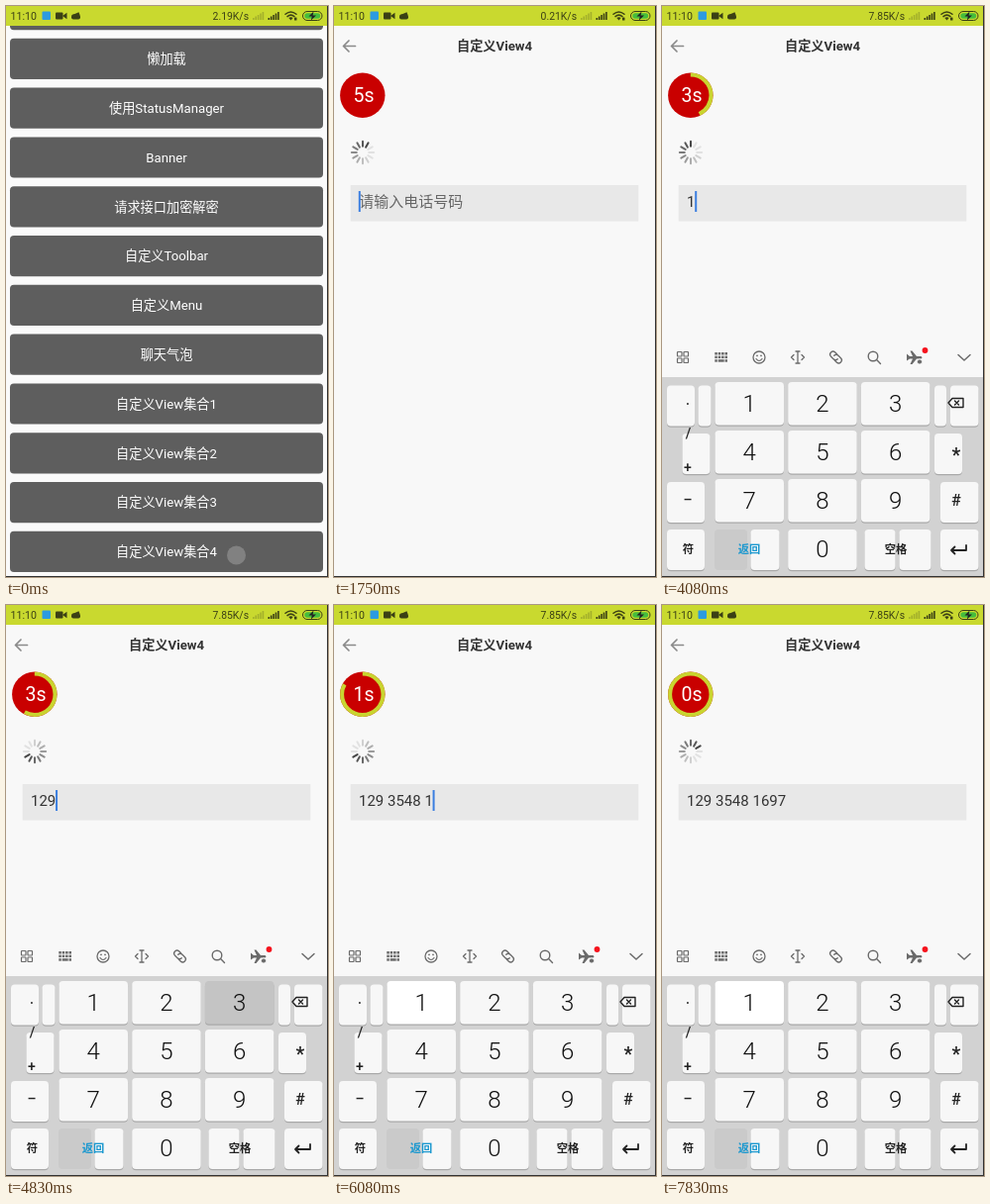
Recreate the animation shown at these times as an HTML page. Size 325 by 577 pixels, loop 7990 ms.

```html
<!DOCTYPE html>
<html lang="zh-CN">
<head>
<meta charset="utf-8">
<title>自定义View4</title>
<style>
html, body { margin: 0; width: 100%; height: 100%; overflow: hidden; background: #f8f8f8; }
svg { display: block; width: 325px; height: 577px; }
text { font-family: Roboto, "Noto Sans CJK SC", "Noto Sans CJK", sans-serif; white-space: pre; }
</style>
</head>
<body>
<svg id="stage" viewBox="0 0 325 577"></svg>
<script>
const LOOP = 7990;
const PAGE_IN = 690, COUNT_START = 1930, COUNT_LENGTH = 5000;
const BOARD_IN = 2090, SWITCH_DOWN = 3420, SWITCH = 3600;
const SPIN_START = 1700, SPIN_STEP = 100;
const NUMBER = '129 3548 1697';
const PRESSES = [3950, 4250, 4500, 4790, 5080, 5350, 5650, 5930, 6250, 6550, 6830];
const HOLD = 110;
const BOLD = 'font-weight="700"', LIGHT = 'font-weight="300"';

const rect = (x, y, w, h, fill, r = 0, more = '') =>
  `<rect x="${x}" y="${y}" width="${w}" height="${h}" rx="${r}" fill="${fill}" ${more}/>`;
const label = (s, x, cy, size, fill, anchor = 'middle', more = '') =>
  `<text x="${x}" y="${cy + size * 0.36}" font-size="${size}" fill="${fill}" text-anchor="${anchor}" ${more}>${s}</text>`;
const line = (d, color = '#666', w = 1.3, more = '') =>
  `<path d="${d}" fill="none" stroke="${color}" stroke-width="${w}" stroke-linecap="round" stroke-linejoin="round" ${more}/>`;
const shape = (d, fill) => `<path d="${d}" fill="${fill}"/>`;
const key = (x, y, w, h = 41, id = '') =>
  rect(x, y + 1.2, w, h, '#a9a9a9', 4) + rect(x, y, w, h, '#f7f7f7', 4, id && `id="${id}"`);

function listView() {
  const items = ['', '懒加载', '使用StatusManager', 'Banner', '请求接口加密解密', '自定义Toolbar', '自定义Menu',
    '聊天气泡', '自定义View集合1', '自定义View集合2', '自定义View集合3', '自定义View集合4'];
  return rect(0, 0, 325, 577, '#fafafa') + items.map((s, i) => {
    const y = -17 + i * 49.8;
    return rect(4, y, 316, 41.2, '#5e5e5e', 4) + label(s, 162, y + 20.6, 13.2, '#fff');
  }).join('') + '<circle id="touch" cx="232.5" cy="555" r="9.5" fill="#999"/>';
}

function pageView() {
  let spokes = '';
  for (let i = 0; i < 12; i++)
    spokes += `<path class="spoke" d="M0-6.2V-11.2" transform="rotate(${i * 30})"/>`;
  return rect(0, 20, 325, 557, '#f8f8f8')
    + line('M21.5 40.5H9.5M15 35L9.5 40.5L15 46', '#8a8a8a', 1.7)
    + label('自定义View4', 162, 40.6, 13.2, '#333', 'middle', BOLD)
    + '<g transform="translate(28.8 90.2)"><circle r="22.7" fill="#c90000"/>'
    + '<circle id="ring" r="20.7" fill="none" stroke="#c9d530" stroke-width="4" pathLength="360" transform="rotate(-90)"/></g>'
    + label('', 30, 90.3, 19.5, '#fff', 'middle', 'id="count"')
    + `<g transform="translate(29 148)" stroke-width="2" stroke-linecap="round">${spokes}</g>`
    + rect(16.7, 181, 290.6, 36.5, '#e8e8e8')
    + label('请输入电话号码', 25.2, 198, 15, '#666', 'start', 'id="hint"')
    + label('', 25, 198, 15, '#333', 'start', 'id="typed"')
    + rect(25, 187, 2, 21, '#3c7fe0', 0, 'id="caret"');
}

function toolbar() {
  const c = '#6a6a6a';
  let s = rect(0, 336, 325, 40, '#f8f8f8');
  for (const [x, y] of [[15.5, 349.5], [22, 349.5], [15.5, 356], [22, 356]])
    s += rect(x, y, 4.5, 4.5, 'none', 0.5, `stroke="${c}" stroke-width="1.2"`);
  for (let i = 0; i < 8; i++)
    s += rect(53.3 + (i % 4) * 3.4, 350 + (i >> 2) * 3.6, 2.5, 2.5, c);
  s += rect(53.3, 357.2, 2.5, 2.5, c) + rect(56.7, 357.2, 6, 2.5, c) + rect(63.5, 357.2, 2.5, 2.5, c);
  s += `<circle cx="98" cy="355" r="6" fill="none" stroke="${c}" stroke-width="1.3"/>`
    + `<circle cx="96" cy="353.3" r=".9" fill="${c}"/><circle cx="100" cy="353.3" r=".9" fill="${c}"/>`
    + line('M95 356.5Q98 360.5 101 356.5', c, 1.2);
  s += line('M135 349H139M137 349V361M135 361H139M133 352.5L130.5 355L133 357.5M141 352.5L143.5 355L141 357.5', c);
  const link = 'M-1.5-3H-4A3 3 0 0 0-4 3H-.5A3 3 0 0 0 2.5 0';
  s += `<g transform="translate(175.5 355) rotate(45)">${line(link, c)}${line(link, c, 1.3, 'transform="rotate(180)"')}</g>`;
  s += `<circle cx="213" cy="354" r="4.8" fill="none" stroke="${c}" stroke-width="1.4"/>` + line('M216.6 357.6L220.5 361.5', c, 1.4);
  s += shape('M247 351.5L250 354H253L250.5 348.5H252.5L257 354H261.5Q263.5 355.3 261.5 356.5H257L252.5 362H250.5L253 356.5H250L247 358.5Z', c)
    + `<circle cx="260" cy="359.5" r="2.6" fill="${c}" stroke="#f8f8f8"/>`
    + '<circle cx="265.5" cy="348" r="2.9" fill="#f5121d"/>';
  return s + line('M299 352.5L305 358L311 352.5', c, 1.5);
}

const backspace = (x, y) => line(`M${x - 8} ${y}L${x - 4} ${y - 4.5}H${x + 7}V${y + 4.5}H${x - 4}ZM${x - 1.5} ${y - 2}l4 4m0-4l-4 4`, '#222', 1.4);
const enter = (x, y) => line(`M${x + 8} ${y - 4}V${y + 1}H${x - 7}M${x - 3.5} ${y - 2.5}L${x - 7} ${y + 1}L${x - 3.5} ${y + 4.5}`, '#222', 1.8);
const word = (s, x, y, color = '#222') => label(s, x, y, 11.3, color, 'middle', BOLD);

function letterBoard() {
  const rows = [
    ['QWERTYUIOP', '1234567890', 18.5, 383.5],
    ['ASDFGHJKL', '~!@#%\'"*?', 34.5, 432],
    ['ZXCVBNM', '()-_:;/', 66.5, 481]
  ];
  let s = rect(0, 375, 325, 202, '#d4d4d4');
  for (const [letters, hints, x0, y] of rows)
    [...letters].forEach((ch, i) => {
      const x = x0 + i * 31.8;
      s += key(x - 13.8, y, 27.6) + label(ch, x, y + 23.3, 19.8, '#111', 'middle', LIGHT)
        + label(hints[i], x, y + 8, 7.5, '#bbb');
    });
  s += key(5, 481, 38) + word('分词', 24, 501.5) + key(281, 481, 38.5) + backspace(300, 501.5);
  const bottom = [[5, 38], [47, 38, 'switchKey'], [89.5, 28.5], [122.5, 78], [204.5, 31], [239.5, 37.5], [281, 38.5]];
  for (const [x, w, id] of bottom) s += key(x, 529, w, 41, id);
  return s + word('符', 24, 549) + label('123', 66, 549, 11.5, '#222', 'middle', 'font-weight="500"')
    + shape('M102 547.5h2.8v2.4q-.4 2.4-2.4 3.2q1.2-1.4 1.1-2.8h-1.5z', '#222')
    + word('空格', 159.5, 549)
    + rect(179, 543.5, 4, 7, 'none', 2, 'stroke="#aaa"') + line('M176.8 548.5Q177 552.5 181 552.5T185.2 548.5M181 552.5V554.5', '#aaa', 1)
    + '<circle cx="218" cy="550" r="2.1" fill="none" stroke="#222" stroke-width="1.3"/>'
    + label('英', 252, 545, 9, '#999') + line('M255.5 555L264 543', '#aaa', 0.8) + label('中', 263.5, 554.5, 9.5, '#222', 'middle', BOLD)
    + enter(300, 549);
}

function numberBoard() {
  let s = rect(0, 375, 325, 202, '#d2d2d2');
  const side = [[5, 383.5, 28], [36.5, 383.5, 13], [20.5, 432, 28], [5, 481, 38], [5, 529, 38], [89.5, 529, 29],
    [204.5, 529, 31], [239.5, 529, 32], [275, 383.5, 12], [291, 383.5, 28.5], [275, 432, 28], [281, 481, 38.5], [281, 529, 38.5]];
  s += rect(53, 529, 33, 41, '#cacaca', 4);
  for (const [x, y, w] of side) s += key(x, y, w);
  for (let n = 1; n <= 9; n++) {
    const x = 53.5 + ((n - 1) % 3) * 73.7, y = 380 + Math.floor((n - 1) / 3) * 49;
    s += key(x, y, 69.5, 43.5, 'digit' + n) + label(n, x + 34.7, y + 21.5, 24, '#111', 'middle', LIGHT);
  }
  s += key(127.2, 529, 69.5, 41, 'digit0') + label(0, 162, 548.5, 24, '#111', 'middle', LIGHT);
  const marks = [['·', 26, 402], ['/', 26.5, 432], ['+', 26, 466], ['–', 26, 498.5], ['*', 297, 453.5], ['#', 297, 499]];
  for (const [ch, x, y] of marks)
    s += label(ch, x, y, ch === '*' ? 20 : x > 100 ? 16 : 14, '#222', 'middle', 'font-weight="500"');
  return s + word('符', 26.5, 548.5) + word('返回', 88, 548.5, '#1b98cf') + word('空格', 236, 548.5)
    + backspace(297, 401) + enter(299, 549);
}

function statusBar() {
  const ink = '#3b4015';
  let s = rect(0, 0, 325, 20, '#c9d92f') + label('11:10', 4.5, 10.3, 10.6, ink, 'start')
    + rect(36.5, 5.5, 8.5, 8.5, '#2c9be0', 1)
    + rect(50, 6.5, 7.5, 7, ink, 1) + shape('M57 10L61.5 6.8V13.2Z', ink)
    + rect(66, 8.5, 9, 5, ink, 2) + shape('M67 9L73.5 6.3L74.5 9Z', ink)
    + label('', 245, 10.3, 10.4, ink, 'end', 'id="speed"');
  for (let i = 0; i < 5; i++) {
    const h = 2 + i * 1.5;
    s += rect(249 + i * 2.4, 14 - h, 1.6, h, '#a3b02b') + rect(264.5 + i * 2.4, 14 - h, 1.6, h, ink);
  }
  return s + line('M282 8.3Q287.5 3.6 293 8.3M284 10.6Q287.5 7.6 291 10.6', ink, 1.5)
    + shape('M285.3 12Q287.5 10.3 289.7 12L287.5 14.5Z', ink) + rect(291, 11.5, 2.5, 3, ink, 0.5)
    + rect(299.5, 5.5, 19.5, 9, '#c9d92f', 4.5, `stroke="${ink}"`) + rect(301.3, 7.2, 15.9, 5.6, '#46bd3c', 2.8)
    + shape('M310.5 5.5L305.5 10.4H308.8L307.8 14.5L313 9.4H309.6Z', '#222');
}

document.getElementById('stage').innerHTML =
  listView() + `<g id="page">${pageView()}</g>`
  + `<g id="board">${toolbar()}<g id="letters">${letterBoard()}</g><g id="numbers">${numberBoard()}</g></g>`
  + statusBar() + rect(324, 0, 1, 577, '#333') + rect(0, 576, 325, 1, '#333');

const $ = id => document.getElementById(id);
const set = (id, name, value) => $(id).setAttribute(name, value);
const show = (id, on) => set(id, 'visibility', on ? 'visible' : 'hidden');
const progress = (t, start, length) => Math.min(1, Math.max(0, (t - start) / length));
const spokes = [...document.querySelectorAll('.spoke')];
const digits = NUMBER.replace(/ /g, '');

function draw(t) {
  set('touch', 'opacity', 0.6 * (1 - progress(t, 90, 160)));
  set('page', 'opacity', progress(t, PAGE_IN, 110));
  $('speed').textContent = t < 740 ? '2.19K/s' : t < 3420 ? '0.21K/s' : '7.85K/s';

  const done = progress(t, COUNT_START, COUNT_LENGTH);
  show('ring', done > 0);
  set('ring', 'stroke-dasharray', done < 1 ? `${done * 360} 360` : 'none');
  $('count').textContent = Math.ceil(5 * (1 - done)) + 's';

  const lead = 1 + Math.floor((t - SPIN_START) / SPIN_STEP);
  spokes.forEach((spoke, i) => {
    const age = (((lead - i) % 12) + 12) % 12;
    const v = Math.round(70 + 155 * Math.min(1, age / 9));
    spoke.setAttribute('stroke', `rgb(${v},${v},${v})`);
  });

  const count = PRESSES.filter(p => t >= p + HOLD).length;
  const typed = NUMBER.slice(0, count + (count > 3) + (count > 7));
  show('hint', !count);
  $('typed').textContent = typed;
  const spaces = typed.split(' ').length - 1;
  set('caret', 'x', 24.8 + count * 8.42 + spaces * 3.71);
  const blinkStart = count ? PRESSES[count - 1] + HOLD : 600;
  show('caret', t > PAGE_IN && Math.floor((t - blinkStart) / 500) % 2 === 0);

  const rise = 1 - (1 - progress(t, BOARD_IN, 260)) ** 3;
  set('board', 'transform', `translate(0 ${(1 - rise) * 241})`);
  show('board', t >= BOARD_IN);
  set('letters', 'display', t < SWITCH ? 'inline' : 'none');
  set('numbers', 'display', t < SWITCH ? 'none' : 'inline');
  set('switchKey', 'fill', t >= SWITCH_DOWN ? '#c4c4c4' : '#f7f7f7');
  const held = PRESSES.findIndex(p => t >= p && t < p + HOLD);
  for (let n = 0; n < 10; n++) {
    const rest = n === 1 && count >= 8 ? '#fff' : '#f7f7f7';
    set('digit' + n, 'fill', held >= 0 && +digits[held] === n ? '#c4c4c4' : rest);
  }
}

const origin = performance.now();
function tick() {
  draw((performance.now() - origin) % LOOP);
  requestAnimationFrame(tick);
}
tick();
</script>
</body>
</html>
```
